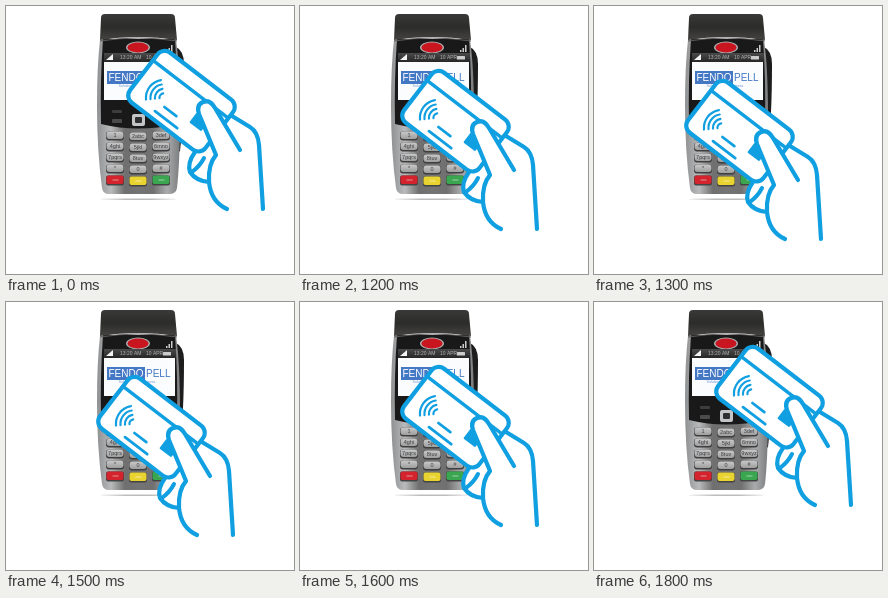
Animation of 288 by 268 pixels, one loop 3400 ms. Source, as an HTML page with a canvas:

```html
<!DOCTYPE html>
<html lang="en">
<head>
<meta charset="utf-8">
<title>Contactless payment</title>
<style>
html, body { margin: 0; width: 100%; height: 100%; overflow: hidden; background: #fff; }
canvas { display: block; }
</style>
</head>
<body>
<canvas id="stage" width="288" height="268"></canvas>
<script>
const ctx = document.getElementById('stage').getContext('2d');
const BLUE = '#109fe0';
const LOOP = 3400, STEP = 100, PEAK = 14, REACH = 4;
const SANS = '"Liberation Sans", Arial, sans-serif';

function gradient(x0, y0, x1, y1, ...colors) {
  const g = ctx.createLinearGradient(x0, y0, x1, y1);
  colors.forEach((c, i) => g.addColorStop(i / (colors.length - 1), c));
  return g;
}

function box(x, y, w, h, r, fill) {
  ctx.beginPath();
  ctx.roundRect(x, y, w, h, r);
  ctx.fillStyle = fill;
  ctx.fill();
}

function oval(x, y, rx, ry, fill) {
  ctx.beginPath();
  ctx.ellipse(x, y, rx, ry, 0, 0, Math.PI * 2);
  ctx.fillStyle = fill;
  ctx.fill();
}

function shape(d, fill, stroke, width = 1) {
  const p = new Path2D(d);
  if (fill) { ctx.fillStyle = fill; ctx.fill(p); }
  if (stroke) { ctx.strokeStyle = stroke; ctx.lineWidth = width; ctx.stroke(p); }
}

function label(text, x, y, font, fill, align = 'center') {
  ctx.font = font + ' ' + SANS;
  ctx.textAlign = align;
  ctx.textBaseline = 'middle';
  ctx.fillStyle = fill;
  ctx.fillText(text, x, y);
}

function drawBody() {
  // faint ground shadow
  box(95, 192.5, 75, 1.5, 1, gradient(95, 0, 170, 0, '#f4f4f4', '#bcbcbc', '#bcbcbc', '#f4f4f4'));

  shape('M168 40 Q178 44 178 58 Q178 110 174 145 L168 150Z', '#1d1d1e');
  shape('M94 34 L170 34 Q174 60 174 110 Q174 155 171 182 Q170 188 163 188 L103 188 Q97 188 96 182 Q91 145 91 100 Q91 60 94 34Z',
    gradient(91, 0, 175, 0, '#8f9091', '#b9babb', '#6f6f6f', '#747474', '#707070', '#aaabac', '#77787a'));
  shape('M97 33 L169 33 Q172 75 171 118 Q132 127 95 118 Q94 75 97 33Z', '#19191a');
  shape('M95 12 Q95 8 99 8 L165 8 Q169 8 169 12 L171 34 Q132 28 94 34Z',
    gradient(0, 8, 0, 34, '#393938', '#2c2c2b', '#444342'));
  shape('M94 35 Q132 29 171 35', null, '#5d5d5d', 1);

  oval(132, 41.5, 12, 6, '#a9a9a9');
  oval(132, 41.5, 10.5, 5, '#c9151f');
  box(160, 44, 1.5, 2, 0, '#ccc');
  box(162.5, 42, 1.5, 4, 0, '#ccc');
  box(165, 39, 1.5, 7, 0, '#ccc');
}

function drawScreen() {
  box(98, 47, 72, 9, 0, gradient(0, 47, 0, 56, '#4a4a4b', '#272728'));
  shape('M100 54 L107 54 L107 48Z', '#f4f4f4');
  label('13:20 AM', 114, 51.8, '5px', '#b5b5b5', 'left');
  label('10 APR', 140, 51.8, '5px', '#b5b5b5', 'left');
  box(157, 50, 8, 3.5, 0.5, '#ccc');

  box(98, 56, 71, 38, 0, '#fbfcfe');
  box(101, 65, 38, 13, 0, '#4478c4');
  label('FENDO', 120, 72, '10px', '#fff');
  label('PELL', 140, 72, '10px', '#4478c4', 'left');
  label('Solutions For Business', 131, 80, '3.6px', '#6d93cd');
}

function drawKeys() {
  for (const x of [106, 148]) {
    box(x, 104, 10, 3, 1, '#3d3d3e');
    box(x, 113, 10, 4, 1, '#4b4b4c');
  }
  box(126, 108, 13, 12, 2, '#c4c5c6');
  box(129, 111, 7, 6, 1, '#303031');

  const text = ['1', '2abc', '3def', '4ghi', '5jkl', '6mno', '7pqrs', '8tuv', '9wxyz', '*', '0', '#'];
  text.forEach((s, i) => {
    const x = 109 + (i % 3) * 23, y = 129.5 + Math.floor(i / 3) * 11 + (i % 3 === 1 ? 1 : 0);
    box(x - 9, y - 4, 18, 9, 3, '#3f3f40');
    box(x - 8.5, y - 4, 17, 7.5, 3, gradient(0, y - 4, 0, y + 4, '#c9c9c9', '#9b9b9b'));
    label(s, x, y, '5.5px', '#3b3d40');
  });
  ['#d3232c', '#e9d331', '#3aa64f'].forEach((c, i) => {
    const x = 100.5 + 23 * i, y = 169.5 + (i === 1 ? 1 : 0);
    box(x - 0.5, y, 18, 10, 2, '#444');
    box(x, y, 17, 8.5, 2, c);
    box(x + 6, y + 4, 6, 1, 0, 'rgba(255,255,255,.5)');
  });
}

function drawCard() {
  ctx.save();
  ctx.translate(175.5, 95.2);
  ctx.rotate(37.5 * Math.PI / 180);
  box(-47.5, -31.5, 95, 63, 9, '#fff');
  ctx.strokeStyle = BLUE;
  ctx.lineWidth = 4.2;
  ctx.stroke();
  shape('M-47 -15 L47 -15', null, BLUE, 3.4);
  shape('M-10 15 L5 15 M-15 24 L13 24', null, BLUE, 2.8);
  box(19, 0, 15, 12, 1, BLUE);
  ctx.lineWidth = 2.2;
  for (const r of [4.5, 9, 13.5, 18]) {
    ctx.beginPath();
    ctx.arc(-16, 8, r, Math.PI - 0.75, Math.PI + 0.75);
    ctx.stroke();
  }
  ctx.restore();
}

function drawPalm() {
  const fingers = 'M189 146 Q181 157 184 166 Q190 175 203 176 Q205 196 221 203';
  const back = 'M226 110 L244 121 Q252 126 253 139 L257 203';
  shape(fingers + ' L257 203 L253 139 Q252 126 244 121 L226 110Z', '#fff');
  shape(fingers, null, BLUE, 4.2);
  shape(back, null, BLUE, 4.2);
  shape('M198 152 Q194 160 186 166', null, BLUE, 4);
}

function drawThumb() {
  shape('M203 176 Q202 158 210 149 L193 108 Q190 99 197 96 Q204 93 209 102 L234 144', '#fff', BLUE, 4.2);
}

function frame(now) {
  const tick = Math.floor((now % LOOP) / STEP);
  const shift = 10 * Math.max(0, REACH - Math.abs(tick - PEAK));
  ctx.fillStyle = '#fff';
  ctx.fillRect(0, 0, 288, 268);
  drawBody();
  drawScreen();
  drawKeys();
  ctx.save();
  ctx.translate(-shift, shift);
  ctx.lineCap = ctx.lineJoin = 'round';
  drawPalm();
  drawCard();
  drawThumb();
  ctx.restore();
}

const start = performance.now();
function loop() {
  frame(performance.now() - start);
  requestAnimationFrame(loop);
}
loop();
</script>
</body>
</html>
```
